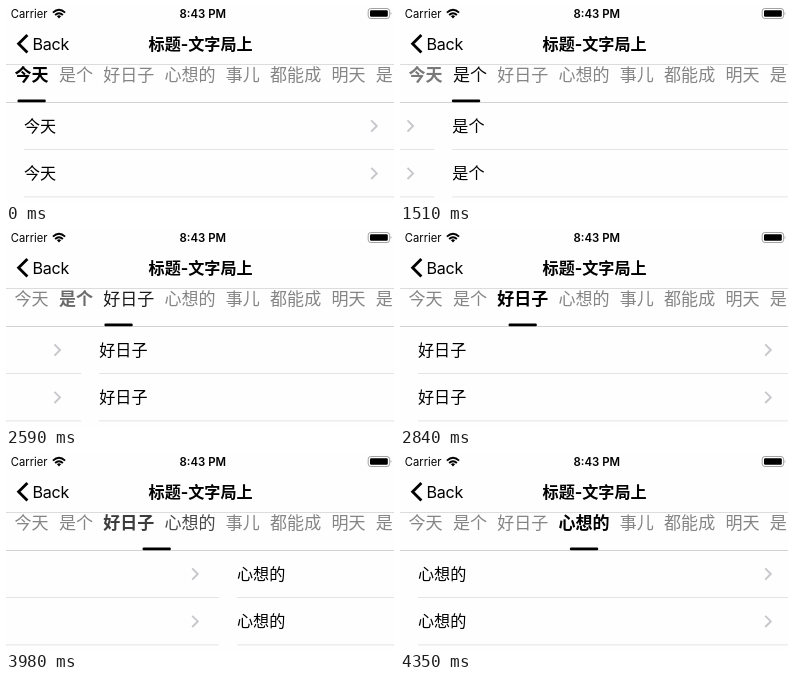
Recreate the animation shown at these times as an HTML page. Size 388 by 196 pixels, loop 5.23 s.

```html
<!DOCTYPE html>
<html lang="zh-CN">
<head>
<meta charset="utf-8">
<style>
  html, body { margin: 0; width: 100%; height: 100%; overflow: hidden; background: #fefefe; }
  svg { display: block; width: 388px; height: 196px; }
  text { font-family: Inter, "Noto Sans CJK SC", "Noto Sans CJK", sans-serif; white-space: pre; }
  .cjk { font-family: "Noto Sans CJK SC", "Noto Sans CJK", sans-serif; }
</style>
</head>
<body>
<svg viewBox="0 0 388 196">
  <rect width="388" height="196" fill="#fefefe"/>
  <g id="pages"></g>

  <!-- status bar -->
  <text x="4.8" y="12" font-size="11.2">Carrier</text>
  <g fill="none" stroke="#000" stroke-width="1.9">
    <path d="M46.9 6.6 Q53 1 59.1 6.6"/>
    <path d="M49.1 9 Q53 5.4 56.9 9"/>
  </g>
  <path d="M50.9 10.2 Q53 8.5 55.1 10.2 L53 12.5Z"/>
  <text x="196.8" y="12" font-size="11.4" font-weight="600" text-anchor="middle">8:43 PM</text>
  <rect x="362.2" y="2.5" width="21.4" height="10" rx="2.6" fill="none" stroke="#999" stroke-width=".9"/>
  <rect x="364" y="4.2" width="17.8" height="6.6" rx="1.2"/>
  <path d="M384.7 6 q1.8 1.5 0 3z" fill="#999"/>

  <!-- navigation bar -->
  <path d="M21.4 29 L12.6 37.8 L21.4 46.6" fill="none" stroke="#000" stroke-width="2.8"/>
  <text x="26.6" y="43.6" font-size="16.1" letter-spacing="-.3">Back</text>
  <text x="194.6" y="43.6" font-size="16.1" font-weight="700" text-anchor="middle">标题-文字局上</text>
  <rect y="58" width="388" height="1" fill="#dcdcdc"/>

  <g id="tabs"></g>
  <rect y="96" width="388" height="1" fill="#d2d2d4"/>
  <rect id="bar" y="93.6" width="28.4" height="2.6" rx="1.3"/>
</svg>
<script>
const LOOP = 5230, PAGE = 392, GRAY = 133;
const TAB_SIZE = 17.04, TAB_GAP = 10.2, BAR = 28.4, ROW = 47.4;
const labels = ['今天', '是个', '好日子', '心想的', '事儿', '都能成', '明天', '是'];

// drag: [time, offset] held until the next entry; the release then eases to the next page
const swipes = [
  { drag: [[1020, 18.5], [1080, 52]], start: 1350, end: 1710, from: 192, step: 32 },
  { drag: [[2150, 5], [2210, 24], [2270, 56]], start: 2540, end: 2840, from: 262, step: 50 },
  { drag: [[3530, 5], [3580, 18], [3630, 40], [3680, 74], [3980, 179]],
    start: 4040, end: 4350, from: 267, step: 38.75 }
];

const byId = id => document.getElementById(id);

function add(parent, tag, attrs, content) {
  const el = document.createElementNS('http://www.w3.org/2000/svg', tag);
  for (const key in attrs) el.setAttribute(key, attrs[key]);
  if (content) el.textContent = content;
  return parent.appendChild(el);
}

let x = 8.6;
const tabs = labels.map(label => {
  const width = label.length * TAB_SIZE;
  const el = add(byId('tabs'), 'text', { x, y: 75.1, 'font-size': TAB_SIZE, class: 'cjk' }, label);
  const center = x + width / 2;
  x += width + TAB_GAP;
  return { el, center };
});

labels.slice(0, 4).forEach((label, i) => {
  const page = add(byId('pages'), 'g', { transform: `translate(${i * PAGE} 0)` });
  for (const top of [0, ROW]) {
    add(page, 'text', { x: 18, y: 126 + top, 'font-size': 16.1, class: 'cjk' }, label);
    add(page, 'path', {
      d: `M365.2 ${114.4 + top} l5.6 5.6 l-5.6 5.6`,
      fill: 'none', stroke: '#c7c7cc', 'stroke-width': 1.9
    });
    add(page, 'rect', { x: 18, y: 143 + top, width: PAGE - 18, height: 1, fill: '#e4e4e6' });
  }
});

function swipeOffset(s, t) {
  if (t >= s.end) return PAGE;
  if (t >= s.start) {
    const elapsed = Math.floor((t - s.start) / s.step + 1e-6) * s.step;
    return PAGE - (PAGE - s.from) * (1 - elapsed / (s.end - s.start)) ** 3;
  }
  return s.drag.reduce((offset, [at, value]) => t >= at ? value : offset, 0);
}

function render(t) {
  const offset = swipes.reduce((sum, s) => sum + swipeOffset(s, t), 0);
  const selected = swipes.filter(s => t >= s.end).length;
  const position = offset / PAGE;
  const left = Math.floor(position);
  const center = tabs[left].center + (tabs[left + 1].center - tabs[left].center) * (position - left);

  byId('pages').setAttribute('transform', `translate(${-offset} 0)`);
  byId('bar').setAttribute('x', center - BAR / 2);
  tabs.forEach(({ el }, i) => {
    const shade = Math.round(GRAY * Math.min(1, Math.abs(position - i)));
    el.setAttribute('fill', `rgb(${shade},${shade},${shade})`);
    el.setAttribute('font-weight', i === selected ? 700 : 400);
  });
}

const origin = performance.now();
function tick() {
  render((performance.now() - origin) % LOOP);
  requestAnimationFrame(tick);
}
tick();
</script>
</body>
</html>
```
